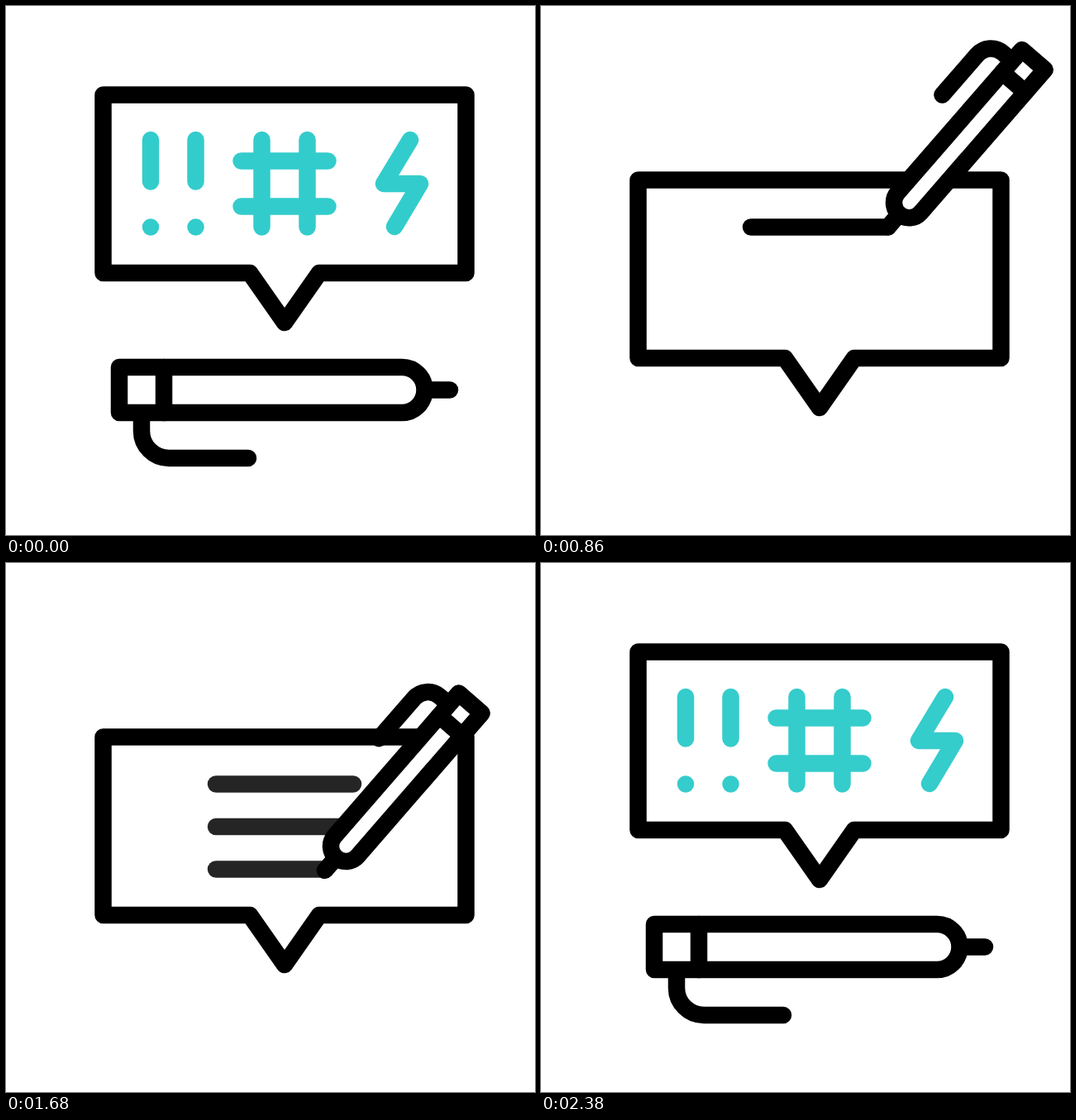
Recreate the animation shown at these times as an HTML page. Size 640 by 640 pixels, loop 2400 ms.

```html
<!DOCTYPE html>
<html lang="en">
<head>
<meta charset="utf-8">
<title>Writing pen</title>
<style>
  html, body { margin: 0; width: 100%; height: 100%; overflow: hidden; background: #fff; }
  svg { display: block; width: 640px; height: 640px; }
  g, path { stroke-linecap: round; stroke-linejoin: round; }
</style>
</head>
<body>
<svg viewBox="0 0 640 640" fill="none" stroke="#000" stroke-width="20.5">
  <g id="bubble">
    <path d="M117.5 107.5H556.5V323H379L337 383L295 323H117.5Z"/>
    <g id="marks" stroke="#33cccc">
      <path d="M175 162V212.5M229.5 162V212.5M175 267.5h.01M229.5 267.5h.01"/>
      <path d="M309.5 162V267.5M364.5 162V267.5M284.5 187.5H389.5M284.5 242.5H389.5"/>
      <path d="M489 162L457 215H501L470 267"/>
    </g>
  </g>
  <g id="lines"><path/><path/><path/></g>
  <g id="pen">
    <path d="M-173 0V22a33 33 0 0 0 33 33H-44"/>
    <path d="M170 -27.5H200"/>
    <path fill="#fff" d="M-200 -55H142a27.5 27.5 0 0 1 0 55H-200Z"/>
    <path d="M-146 -55V0"/>
  </g>
</svg>
<script>
const LOOP = 2400, STROKE = 20.5;
const HOME = { x: 337, y: 492 };   // centre of the resting pen
const GRIP = { x: 74, y: -113.5 }; // from the tip to the centre while writing
const LEFT = 254, FULL = 166;      // start and length of a full line

const byId = id => document.getElementById(id);
const bubble = byId('bubble'), marks = byId('marks'), lines = byId('lines'), pen = byId('pen');

const mix = (a, b, u) => a + (b - a) * u;
const linear = u => u;
const smooth = u => u * u * (3 - 2 * u);
const span = (t, a, b, ease = smooth) => ease(Math.min(1, Math.max(0, (t - a) / (b - a))));

// equal rows at an equal beat; the last one is shorter
const rows = [...lines.children].map((path, i, all) => {
  const length = FULL * (i < all.length - 1 ? 1 : 0.8);
  const start = 550 + 425 * i;
  return { path, length, start, end: start + 310 * length / FULL, y: 267.5 + 51.5 * i };
});

// glide to each row, write it, then go home
function penAt(t) {
  let { x, y } = HOME, leave = 40;
  for (const row of rows) {
    const u = span(t, leave, row.start - 10);
    x = mix(x, LEFT + GRIP.x, u) + row.length * span(t, row.start, row.end);
    y = mix(y, row.y + GRIP.y, u);
    leave = row.end;
  }
  const u = span(t, leave, 2313);
  return [mix(x, HOME.x, u), mix(y, HOME.y, u)];
}

function draw(t) {
  const drop = 103 * (span(t, 40, 545, linear) - span(t, 1700, 2352, linear));
  bubble.setAttribute('transform', `translate(0 ${drop})`);
  marks.setAttribute('opacity', 1 - span(t, 40, 240, linear) + span(t, 2180, 2383, linear));

  // the ink trails the tip a little
  lines.setAttribute('opacity', 1 - span(t, 1660, 1800, linear));
  for (const { path, length, start, end, y } of rows) {
    const w = length * span(t, start + 25, end);
    path.setAttribute('d', w > 0 ? `M${LEFT} ${y}h${w}` : '');
  }

  // the outline keeps its weight while the pen shrinks
  const turn = span(t, 40, 540) - span(t, 1700, 2360);
  const scale = 1 - 0.33 * turn;
  const [x, y] = penAt(t);
  pen.setAttribute('transform', `translate(${x} ${y}) rotate(${131 * turn}) scale(${scale})`);
  pen.setAttribute('stroke-width', STROKE / scale);
}

const begin = performance.now();
function tick() {
  draw((performance.now() - begin) % LOOP);
  requestAnimationFrame(tick);
}
draw(0);
requestAnimationFrame(tick);
</script>
</body>
</html>
```
